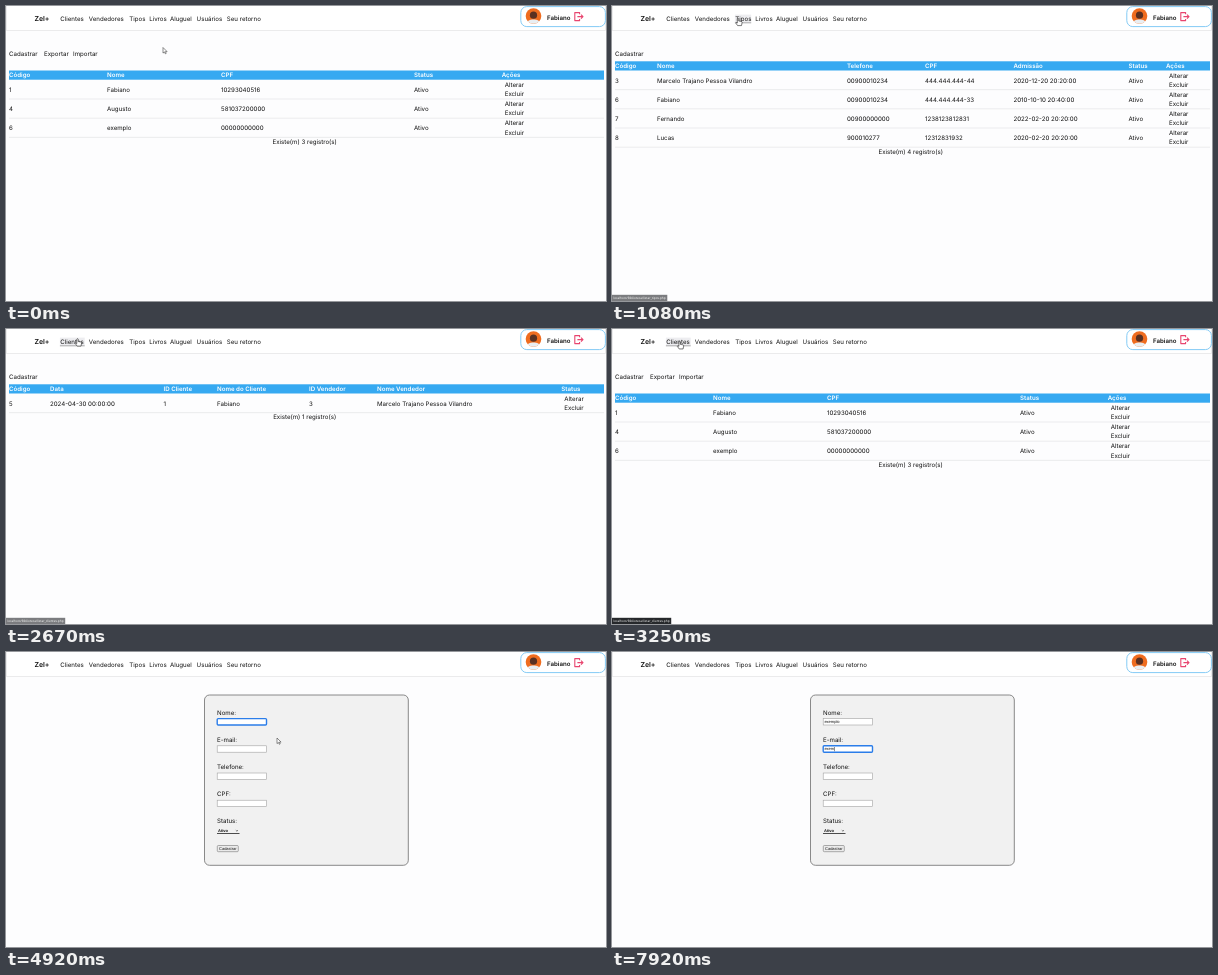
Animation of 600 by 295 pixels, one loop 8000 ms. Source, as an HTML page:

```html
<!DOCTYPE html>
<html lang="pt-BR">
<head>
<meta charset="utf-8">
<title>Biblioteca</title>
<style>
html, body { margin: 0; width: 100%; height: 100%; overflow: hidden; background: #fdfdfe; }
svg { display: block; width: 100%; height: 100%; }
text { font: 6.15px Inter, "Open Sans", sans-serif; fill: #111; white-space: pre; text-rendering: geometricPrecision; }
.b { font-weight: 600; }
.th { font-weight: 600; fill: #fff; }
.brand { font-size: 6.9px; font-weight: 600; }
.ui { font: 4px "Liberation Sans", Arial, sans-serif; }
.url { font: 3.15px "Open Sans", sans-serif; fill: #fff; }
</style>
</head>
<body>
<svg viewBox="0 0 600 295" preserveAspectRatio="none">
  <rect width="600" height="295" fill="#fdfdfe"/>
  <rect x=".5" y="-1" width="599" height="25.5" fill="#fff" stroke="#e6e6e8" stroke-width=".8"/>
  <g id="hover">
    <rect id="hoverBg" y="8.6" height="8.2" fill="#ededf0"/>
    <rect id="hoverLine" y="16.6" height=".6" fill="#777"/>
  </g>
  <g id="nav"></g>
  <rect x="514.8" y=".6" width="84.6" height="20" rx="6" fill="#fff" stroke="#84cbf5" stroke-width="1"/>
  <clipPath id="round"><circle cx="527.5" cy="10" r="7.8"/></clipPath>
  <g clip-path="url(#round)">
    <rect x="519" y="2" width="17" height="17" fill="#ef6c1f"/>
    <path d="M520.5 19c0-4 3-5.4 7-5.4s7 1.4 7 5.4z" fill="#e9eef2"/>
    <circle cx="527.5" cy="9.2" r="3.6" fill="#5a3021"/>
  </g>
  <text class="b" x="541" y="14.2">Fabiano</text>
  <path d="M573.6 8.2V6.6H568.8V14.6H573.6V13M571.4 10.6H577M575 8.6L577 10.6L575 12.6" fill="none" stroke="#e8456f" stroke-width="1.1" stroke-linejoin="round"/>
  <g id="page"></g>
  <g id="status">
    <rect id="statusBg" y="288.8" height="6.2" fill="#26282b"/>
    <text id="statusText" class="url" x="1.4" y="293.2"></text>
  </g>
  <path id="arrow" d="M0 0V5.6L1.4 4.4L2.3 6.3L3.2 5.9L2.4 4.1H4.1Z" fill="#fff" stroke="#333" stroke-width=".55" stroke-linejoin="round"/>
  <path id="hand" d="M-.7 .6Q0-.5 .7 .6V3L3.4 3.5Q4.2 3.8 4.1 4.6L3.5 7.6H-.4L-2.3 4.9Q-2.2 3.9-.7 5Z" fill="#fff" stroke="#222" stroke-width=".6" stroke-linejoin="round"/>
</svg>
<script>
const LOOP = 8000;
const $ = id => document.getElementById(id);
const set = (el, attrs) => { for (const k in attrs) el.setAttribute(k, attrs[k]); };
const text = (x, mid, s, cls = '', extra = '') =>
  `<text class="${cls}" x="${x}" y="${mid + 2.2}" ${extra}>${s}</text>`;
const rect = (x, y, w, h, fill, extra = '') =>
  `<rect x="${x}" y="${y}" width="${w}" height="${h}" fill="${fill}" ${extra}/>`;

// label, left, right, page behind the link
const NAV = [
  ['Clientes', 54.3, 78.5, 'listar_clientes'],
  ['Vendedores', 82.8, 119, 'listar_vendedores'],
  ['Tipos', 123.3, 139, 'listar_tipos'],
  ['Livros', 143.2, 160, 'listar_livros'],
  ['Aluguel', 164, 187, 'listar_aluguel'],
  ['Usuários', 190.6, 216, 'listar_usuarios'],
  ['Seu retorno', 220.8, 255, 'listar_retorno']
];
const REGISTER = ['Cadastrar', 3, 33.5, 'cadastrar_clientes'];
$('nav').innerHTML = text(28.4, 12.7, 'Zel+', 'brand') +
  NAV.map(([s, x]) => text(x, 12.8, s)).join('');

const SELLER = 'Marcelo Trajano Pessoa Vilandro';
const TABLES = {
  clients: {
    links: true,
    cols: [3, 101, 215, 408, 495.7],
    head: ['Código', 'Nome', 'CPF', 'Status', 'Ações'],
    rows: [
      ['1', 'Fabiano', '10293040516', 'Ativo'],
      ['4', 'Augusto', '581037200000', 'Ativo'],
      ['6', 'exemplo', '00000000000', 'Ativo']
    ]
  },
  sellers: {
    cols: [3, 45, 235, 313, 401.5, 516.5, 554],
    head: ['Código', 'Nome', 'Telefone', 'CPF', 'Admissão', 'Status', 'Ações'],
    rows: [
      ['3', SELLER, '00900010234', '444.444.444-44', '2020-12-20 20:20:00', 'Ativo'],
      ['6', 'Fabiano', '00900010234', '444.444.444-33', '2010-10-10 20:40:00', 'Ativo'],
      ['7', 'Fernando', '00900000000', '1238123812831', '2022-02-20 20:20:00', 'Ativo'],
      ['8', 'Lucas', '900010277', '12312831932', '2020-02-20 20:20:00', 'Ativo']
    ]
  },
  genres: {
    cols: [3, 142.5, 452],
    head: ['Código', 'Gênero', 'Ações'],
    rows: [['2', 'Ficção Ciêntifica']]
  },
  rentals: {
    cols: [3, 44, 157.5, 211, 303, 371, 555.3],
    head: ['Código', 'Data', 'ID Cliente', 'Nome do Cliente', 'ID Vendedor', 'Nome Vendedor', 'Status'],
    rows: [['5', '2024-04-30 00:00:00', '1', 'Fabiano', '3', SELLER]]
  }
};

function drawTable({ links, cols, head, rows }) {
  const top = links ? 64.5 : 55.3, step = 19.1;
  const actions = cols[cols.length - 1] + 3;
  let out = text(3, 47.4, 'Cadastrar');
  if (links) out += text(38, 47.4, 'Exportar') + text(67, 47.4, 'Importar');
  out += rect(3, top, 595, 9.2, '#36a9f1');
  head.forEach((s, i) => out += text(cols[i], top + 4.6, s, 'th'));
  rows.forEach((row, r) => {
    const y = top + r * step;
    row.forEach((s, i) => out += text(cols[i], y + 19.1, s));
    out += text(actions, y + 14.4, 'Alterar') + text(actions, y + 23.6, 'Excluir');
    out += rect(3, y + 28.2, 595, .6, '#dedfe2');
  });
  return out + text(298.7, top + rows.length * step + 13.7,
    `Existe(m) ${rows.length} registro(s)`, '', 'text-anchor="middle"');
}

const FIELDS = ['Nome:', 'E-mail:', 'Telefone:', 'CPF:'];
function drawForm(values, focus, caret) {
  let out = rect(198.5, 43, 203.8, 170.3, '#f1f1f1', 'rx="5" stroke="#6d6d6d" stroke-width=".8"');
  FIELDS.forEach((label, i) => {
    const y = 66.6 + i * 27.2, on = i === focus;
    out += text(211, y - 6.2, label);
    out += rect(211.2, y, 49.3, 6.4, '#fff', on
      ? 'rx="1" stroke="#2b7de9" stroke-width="1.4"'
      : 'stroke="#a2a2a2" stroke-width=".6"');
    const s = values[i] || '';
    out += `<text class="ui" x="212.4" y="${y + 4.5}">${s}</text>`;
    if (on && caret) out += rect(212.5 + inputWidth(s), y + 1.2, .5, 4.2, '#222');
  });
  out += text(211, 169, 'Status:');
  out += '<text class="ui" x="212" y="180" style="font-weight:700">Ativo</text>';
  out += rect(211, 181, 22.5, .8, '#222');
  out += '<path d="M229.8 178.2l1.1 1l1.1-1" fill="none" stroke="#222" stroke-width=".6"/>';
  out += rect(211.3, 193.5, 21, 6.2, '#ebebeb', 'rx="1" stroke="#777" stroke-width=".6"');
  return out + '<text class="ui" x="221.8" y="198" text-anchor="middle">Cadastrar</text>';
}

const pen = document.createElement('canvas').getContext('2d');
pen.font = '40px "Liberation Sans", Arial, sans-serif';
const inputWidth = s => pen.measureText(s).width / 10;

const PAGES = [[0, 'clients'], [830, 'sellers'], [1330, 'genres'], [2340, 'rentals'], [3000, 'clients'], [4420, 'form']];
const pageAt = t => PAGES.filter(p => p[0] <= t).pop()[1];

// pointer tip: time, x, y
const PATH = [
  [80, 157, 41.5], [600, 100, 12], [830, 100, 12], [1010, 126, 12], [1330, 126, 12],
  [1750, 157.5, 11.5], [2080, 157.5, 11.5], [2250, 175, 11.5], [2340, 175, 11.5],
  [2600, 71.5, 9.5], [3120, 71.5, 9.5], [3900, 19.5, 47.5], [4370, 19.5, 47.5], [4880, 271, 86]
];
const TYPING = 5920;

function pointer(t) {
  const i = PATH.findIndex(p => p[0] > t);
  if (i === 0) return PATH[0].slice(1);
  if (i < 0) return PATH[PATH.length - 1].slice(1);
  const [t0, x0, y0] = PATH[i - 1], [t1, x1, y1] = PATH[i];
  const u = (t - t0) / (t1 - t0), e = u * u * (3 - 2 * u);
  return [x0 + (x1 - x0) * e, y0 + (y1 - y0) * e];
}

function linkAt(t) {
  const [x, y] = pointer(t);
  const inside = l => x >= l[1] && x <= l[2];
  if (y > 8 && y < 18) return NAV.find(inside);
  if (y > 43 && y < 52 && pageAt(t) !== 'form' && inside(REGISTER)) return REGISTER;
}

const typed = (word, t, start, gap) =>
  t < start ? '' : word.slice(0, 1 + Math.floor((t - start) / gap));

let shown = '';
function drawPage(t) {
  const page = pageAt(t);
  const name = typed('exemplo', t, TYPING, 120);
  const mail = typed('exem', t, 7500, 125);
  const focus = t < 7170 ? 0 : 1;
  const active = (t >= TYPING && t < 6750) || t >= 7500;
  const caret = active || Math.floor((t - 4420) / 500) % 2 === 0;
  const key = page === 'form' ? [name, mail, focus, caret].join() : page;
  if (key === shown) return;
  shown = key;
  $('page').innerHTML = page === 'form' ? drawForm([name, mail], focus, caret) : drawTable(TABLES[page]);
}

function drawStatus(t, link) {
  let seen = 0;
  if (link) for (let k = 0; k < 10; k++) if (linkAt(Math.max(0, t - k * 20)) === link) seen++;
  set($('status'), { opacity: seen / 10 });
  if (!link) return;
  const url = `localhost/Biblioteca/${link[3]}.php`, label = $('statusText');
  if (label.textContent !== url) {
    label.textContent = url;
    set($('statusBg'), { width: label.getComputedTextLength() + 3 });
  }
}

function draw(t) {
  drawPage(t);
  const link = linkAt(t), [x, y] = pointer(t);
  const onNav = link && link !== REGISTER;
  set($('hover'), { opacity: onNav ? 1 : 0 });
  if (onNav) for (const id of ['hoverBg', 'hoverLine']) set($(id), { x: link[1] - .4, width: link[2] - link[1] + .6 });
  drawStatus(t, link);
  const at = `translate(${x} ${y})`;
  set($('arrow'), { transform: at, opacity: !link && t < TYPING ? 1 : 0 });
  set($('hand'), { transform: at, opacity: link ? 1 : 0 });
}

const start = performance.now();
function tick() {
  draw((performance.now() - start) % LOOP);
  requestAnimationFrame(tick);
}
tick();
</script>
</body>
</html>
```
